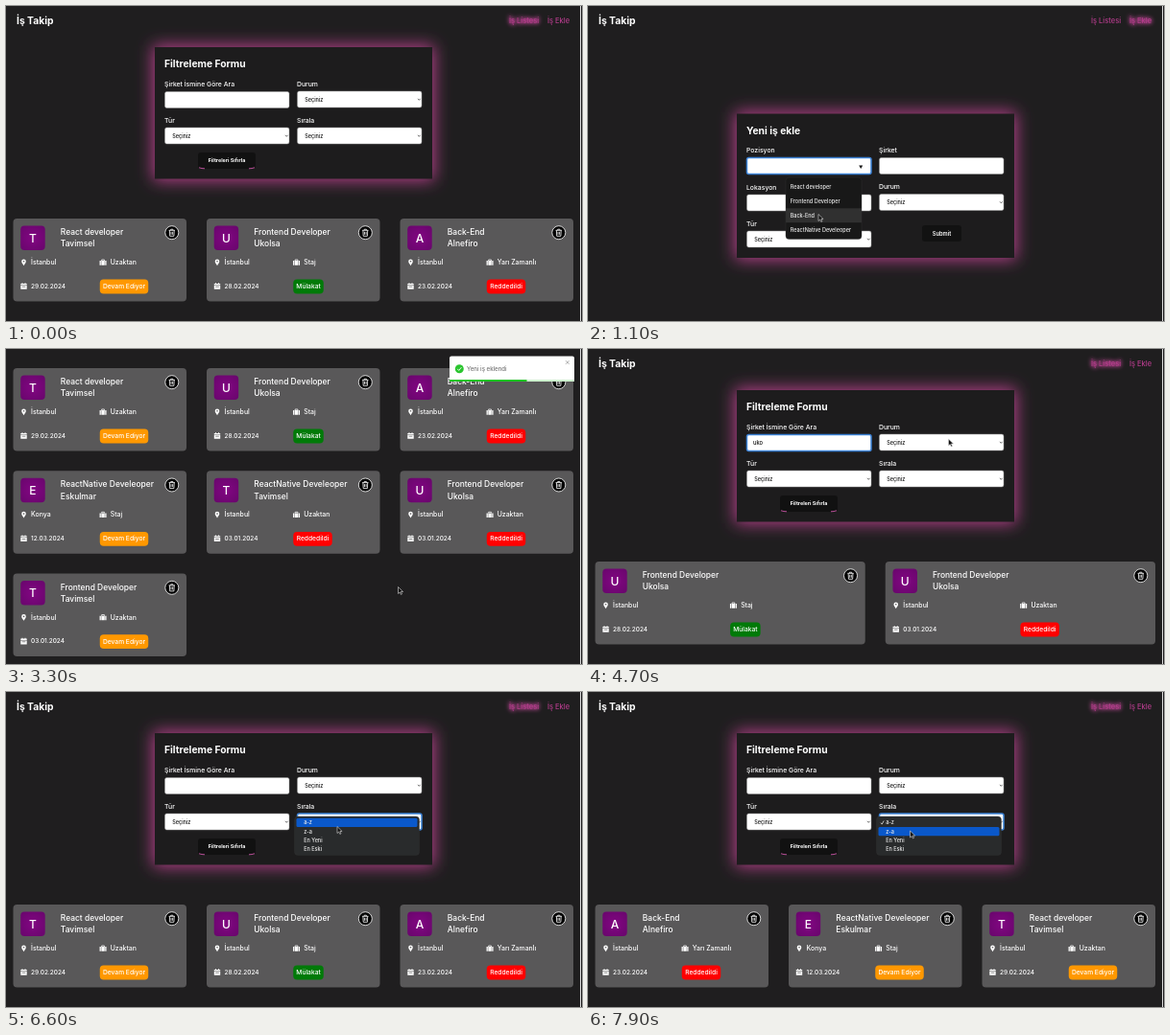
These frames come from a looping animation (600 px wide and 329 px high, 8000 ms). An HTML page:

```html
<!DOCTYPE html>
<html lang="tr">
<head>
<meta charset="utf-8">
<title>İş Takip</title>
<style>
  html, body { margin: 0; width: 100%; height: 100%; overflow: hidden; background: #1f1e1f; }
  svg { display: block; width: 100vw; height: 100vh; font-family: Inter, "Open Sans", sans-serif; font-weight: 500; }
</style>
</head>
<body>
<svg viewBox="0 0 600 329">
  <defs>
    <filter id="blur" x="-20%" y="-40%" width="140%" height="180%"><feGaussianBlur stdDeviation="8.5"/></filter>
    <filter id="halo" x="-30%" y="-80%" width="160%" height="260%"><feGaussianBlur stdDeviation="2"/></filter>
    <radialGradient id="purple" r=".75"><stop stop-color="#820682"/><stop offset="1" stop-color="#66066a"/></radialGradient>
    <g id="pin" fill="#fff"><path d="M0 3.5C-1.2 1.6-2.3.5-2.3-.9a2.3 2.3 0 0 1 4.6 0C2.3.5 1.2 1.6 0 3.5z"/><circle cy="-.9" r=".8" fill="#595859"/></g>
    <g id="case" fill="#fff"><path d="M-3.5-1.6h1.3v4.6h-1.3zM2.2-1.6h1.3v4.6H2.2zM-1.7-1.6h3.4v4.6h-3.4z"/><path d="M-1.4-1.5v-1.2h2.8v1.2" fill="none" stroke="#fff" stroke-width=".8"/></g>
    <g id="date" fill="#fff"><path d="M-3.2-2.6h6.4v1.3h-6.4zM-3.2-.8h6.4v4h-6.4zM-2-3.4h1v1h-1zM1-3.4h1v1h-1z"/><path d="M-1.8.6h3.6" stroke="#595859" stroke-width=".7"/></g>
    <g id="trash" fill="none" stroke="#fff" stroke-width=".8"><circle r="7" fill="#000"/><path d="M-3.2-2.4h6.4M-1.1-2.5v-1h2.2v1M-2.4-2.4l.3 6h4.2l.3-6M-.8-.9v3M.8-.9v3"/></g>
    <path id="arrow" d="M0 0v7l1.7-1.5 1.1 2.4 1.2-.5-1.1-2.4h2.2z" fill="#111" stroke="#ddd" stroke-width=".6"/>
  </defs>
  <g id="scene"></g>
  <path d="M598.5 0v329" stroke="#ddd"/>
</svg>
<script>
const LOOP = 8000, STEP = 100;
const scene = document.getElementById('scene');

const T = 'Tavimsel', U = 'Ukolsa', A = 'Alnefiro', E = 'Eskulmar';
const roles = ['React developer', 'Frontend Developer', 'Back-End', 'ReactNative Develeoper'];
const GOING = 'Devam Ediyor', TALK = 'Mülakat', NO = 'Reddedildi';
const badges = { [GOING]: ['#ff9800', 50.5], [TALK]: ['#007a08', 31.5], [NO]: ['#f00', 40.5] };
const kinds = ['Uzaktan', 'Staj', 'Yarı Zamanlı'];
const jobs = [
  [0, T, 'İstanbul', 0, '29.02.2024', GOING],
  [1, U, 'İstanbul', 1, '28.02.2024', TALK],
  [2, A, 'İstanbul', 2, '23.02.2024', NO],
  [3, E, 'Konya', 1, '12.03.2024', GOING],
  [3, T, 'İstanbul', 0, '03.01.2024', NO],
  [1, U, 'İstanbul', 0, '03.01.2024', NO],
  [1, T, 'İstanbul', 0, '03.01.2024', GOING]
].map(([role, firm, city, kind, date, status]) => ({ role: roles[role], firm, city, kind: kinds[kind], date, status }));

const states = [GOING, TALK, NO], L = 165.5, R = 303.5;
// id, label, x, y, type, options
const forms = {
  list: { title: 'Filtreleme Formu', y: 43, h: 137.5, fields: [
    ['search', 'Şirket İsmine Göre Ara', L, 89.5, 'text'],
    ['status', 'Durum', R, 89, 'select', states],
    ['kind', 'Tür', L, 127, 'select', kinds],
    ['sort', 'Sırala', R, 127, 'select', ['a-z', 'z-a', 'En Yeni', 'En Eski']]] },
  add: { title: 'Yeni iş ekle', y: 112.5, h: 150.5, fields: [
    ['role', 'Pozisyon', L, 158.5, 'combo', roles],
    ['firm', 'Şirket', R, 158.5, 'combo', [T, U, A, E]],
    ['city', 'Lokasyon', L, 197, 'combo', ['İstanbul', 'Konya']],
    ['state', 'Durum', R, 196.5, 'select', states],
    ['type', 'Tür', L, 235, 'select', kinds]] }
};

// Each entry patches the state from its time on
const events = [
  [0, { page: 'list', search: '' }],
  [500, { page: 'add' }],
  [1000, { focus: 'role', open: 'role' }],
  [1300, { role: roles[1], open: '' }],
  [1500, { focus: 'firm', open: 'firm' }],
  [1700, { firm: T, open: '' }],
  [1900, { focus: 'city', open: 'city' }],
  [2100, { city: 'İstanbul', open: '' }],
  [2300, { focus: 'state', open: 'state' }],
  [2400, { state: GOING, open: '' }],
  [2500, { focus: 'type', open: 'type' }],
  [2700, { type: kinds[0], open: '' }],
  [2800, { page: 'list', focus: '' }],
  [3700, { focus: 'search' }],
  [3900, { search: 'u' }],
  [4100, { search: 'uk' }],
  [4300, { search: 'uko' }],
  [5000, { search: '', focus: '' }],
  [5200, { focus: 'status', open: 'status' }],
  [5500, { status: GOING, open: '' }],
  [6100, { status: '', focus: '' }],
  [6400, { focus: 'sort', open: 'sort' }],
  [6800, { sort: 'a-z', open: '', focus: '' }],
  [7800, { focus: 'sort', open: 'sort' }]
];

const pointer = [[0, 640, 60], [400, 575, 15], [600, 575, 15], [1000, 238, 168], [1100, 240, 217.5], [1200, 238, 203],
  [1300, 238, 203], [1500, 372, 167], [1600, 372, 188], [1700, 372, 188], [1900, 232, 205], [2000, 232, 226], [2100, 232, 226],
  [2300, 350, 204], [2400, 350, 204], [2500, 230, 243], [2600, 230, 243], [2800, 370, 238], [3200, 408.5, 248.5],
  [3400, 408.5, 248.5], [3700, 232, 98], [4400, 232, 98], [4700, 375.5, 94], [4900, 232, 161], [5000, 232, 161],
  [5200, 368, 97], [5500, 368, 97], [5800, 416, 158.5], [6000, 232, 161], [6100, 232, 161], [6400, 350, 135],
  [6500, 345, 145], [6700, 345, 136], [6800, 345, 136], [7300, 311, 209], [7500, 311, 209], [7800, 337, 135], [7900, 335.5, 145]];
const scrolling = [[3000, 0], [3200, 202], [3400, 202], [3600, 0], [7200, 0], [7400, 156], [7500, 156], [7700, 0]];

function track(keys, t) {
  const i = keys.findIndex(k => k[0] > t);
  if (i === 0) return keys[0].slice(1);
  if (i < 0) return keys.at(-1).slice(1);
  const a = keys[i - 1], b = keys[i], p = (t - a[0]) / (b[0] - a[0]), e = p * p * (3 - 2 * p);
  return a.slice(1).map((v, j) => v + (b[j + 1] - v) * e);
}

const rect = (x, y, w, h, fill, rx = 0, more = '') =>
  `<rect x="${x}" y="${y}" width="${w}" height="${h}" rx="${rx}" fill="${fill}" ${more}/>`;
const text = (x, y, size, str, fill = '#fff', more = '') =>
  `<text x="${x}" y="${y}" font-size="${size}" fill="${fill}" ${more}>${str}</text>`;
const icon = (id, x, y) => `<use href="#${id}" x="${x}" y="${y}"/>`;
const BOLD = 'font-weight="700"', SEMI = 'font-weight="600"', MID = 'text-anchor="middle"';

function link(x, str, active) {
  return (active ? text(x, 18.2, 7.5, str, '#c8489c', 'filter="url(#halo)" stroke="#c8489c" stroke-width=".8"') : '')
    + text(x, 18.2, 7.5, str, '#b53c8c');
}

function field([id, label, x, y, type], s) {
  const focus = s.focus === id, value = s[id] || '';
  let out = text(x - .5, y - 5.5, 6.85, label)
    + rect(x, y, 129.5, 17, '#fff', 2, focus ? 'stroke="#3b82d6" stroke-width="1.5"' : 'stroke="#999" stroke-width=".5"');
  if (type === 'select') {
    out += text(x + 7.7, y + 10.6, 5.5, value || 'Seçiniz', '#111')
      + `<path d="M${x + 125.5} ${y + 7.8}l1.3 1.5 1.3-1.5" fill="none" stroke="#333" stroke-width=".7"/>`;
  } else {
    out += text(x + 6.5, y + 10.6, 5.8, value, '#111');
    if (type === 'combo' && focus) out += `<path d="M${x + 116.7} ${y + 8}h4l-2 3.6z" fill="#111"/>`;
  }
  return out;
}

function popup([id, , x, y, type, options], s, cy) {
  const combo = type === 'combo', row = combo ? 14.9 : 9.2;
  const px = combo ? x + 40.5 : x - 3, py = combo ? y + 20.5 : y + 3, pad = combo ? 2.5 : 1.8;
  const w = combo ? 79 : 130, hover = Math.floor((cy - py - pad) / row);
  return rect(px, py, w, options.length * row + 2 * pad, combo ? '#181818' : '#292b2c', 3.5, 'stroke="#333" stroke-width=".4"')
    + options.map((o, i) => {
      const top = py + pad + i * row;
      return (i === hover ? rect(px + (combo ? 0 : 2), top, w - (combo ? 0 : 4), row, combo ? '#303030' : '#0a58ca', combo ? 0 : 1.5) : '')
        + (!combo && s[id] === o ? `<path d="M${px + 4.5} ${top + 4.8}l1.2 1.5 2-3.6" fill="none" stroke="#fff" stroke-width=".7"/>` : '')
        + text(px + (combo ? 4.7 : 9.7), top + row / 2 + 2, 5.5, o, '#eee');
    }).join('');
}

function form(s) {
  const f = forms[s.page];
  const button = s.page === 'list'
    ? rect(200, 153, 60, 17, '#111', 3) + text(230, 163.4, 5.4, 'Filtreleri Sıfırla', '#fff', `${BOLD} ${MID}`)
      + '<path d="M201 168.8q3 1 6 1M253 169.8q3 0 6-1" fill="none" stroke="#b84f98" stroke-width="1"/>'
    : rect(348, 229, 41, 17, '#121212', 3) + text(368.5, 239.6, 5.7, 'Submit', '#fff', `${SEMI} ${MID}`);
  return rect(153, f.y - 2, 293, f.h + 4, '#b53f8a', 3, 'filter="url(#blur)"')
    + rect(155, f.y, 289, f.h, '#1d1c1d')
    + text(165, f.y + 21.2, 10.3, f.title, '#fff', BOLD)
    + f.fields.map(d => field(d, s)).join('') + button;
}

function card(job, i, cols) {
  const w = (583.5 - (cols - 1) * 21) / cols, half = w / 2;
  const x = 7.5 + (i % cols) * (w + 21), y = 222 + Math.floor(i / cols) * 107.3;
  const [color, bw] = badges[job.status];
  return `<g transform="translate(${x} ${y})">`
    + rect(0, 0, w, 86.5, '#595859', 4)
    + rect(7.7, 7.5, 25.5, 25.5, 'url(#purple)', 4)
    + text(20.4, 24.5, 12, job.firm[0], '#fff', MID)
    + text(49.3, 17, 8.45, job.role) + text(49.3, 29.4, 8.45, job.firm)
    + icon('trash', w - 15.2, 14.7)
    + icon('pin', 11, 45.7) + text(18.6, 48, 6.9, job.city)
    + icon('case', half + 3.3, 45.7) + text(half + 11, 48, 6.9, job.kind)
    + icon('date', 11, 70.6) + text(18.6, 72.9, 6.45, job.date)
    + rect(half, 63.6, bw, 14.8, color, 4) + text(half + bw / 2, 73, 6.7, job.status, '#fff', MID)
    + '</g>';
}

function cards(s) {
  const shown = jobs.filter(j => j.firm.toLowerCase().includes(s.search) && (!s.status || j.status === s.status));
  if (s.sort) shown.sort((a, b) => a.firm.localeCompare(b.firm));
  return shown.map((j, i) => card(j, i, Math.min(3, shown.length))).join('');
}

function toast(t) {
  const left = 1 - (t - 2900) / 1050;
  if (left <= 0 || left > 1) return '';
  return rect(462, 7.5, 130, 26.5, '#fff', 2) + rect(462, 32, 130, 2, '#cdf2ce') + rect(462, 32, 130 * left, 2, '#1fc424')
    + '<circle cx="472.3" cy="20.7" r="4.5" fill="#2ac52f"/><path d="M470.2 20.8l1.5 1.6 2.7-3.2" fill="none" stroke="#fff" stroke-width=".9"/>'
    + text(480, 23.2, 6.1, 'Yeni iş eklendi', '#757575')
    + '<path d="M583 12.2l3.6 3.6m0-3.6l-3.6 3.6" stroke="#999" stroke-width=".8"/>';
}

function render(t) {
  const s = Object.assign({}, ...events.filter(e => e[0] <= t).map(e => e[1]));
  const [cx, cy] = track(pointer, t), [top] = track(scrolling, t);
  const open = s.open && forms[s.page].fields.find(f => f[0] === s.open);
  scene.innerHTML = `<g transform="translate(0 ${-top})">`
    + text(11, 18.8, 10.3, 'İş Takip', '#fff', BOLD)
    + link(524, 'İş Listesi', s.page === 'list') + link(564, 'İş Ekle', s.page === 'add')
    + form(s) + (s.page === 'list' ? cards(s) : '') + (open ? popup(open, s, cy) : '') + '</g>'
    + toast(t) + icon('arrow', cx, cy);
}

const start = performance.now();
let last = -1;
function tick() {
  const t = Math.floor((performance.now() - start) % LOOP / STEP) * STEP;
  if (t !== last) render(last = t);
  requestAnimationFrame(tick);
}
tick();
</script>
</body>
</html>
```
